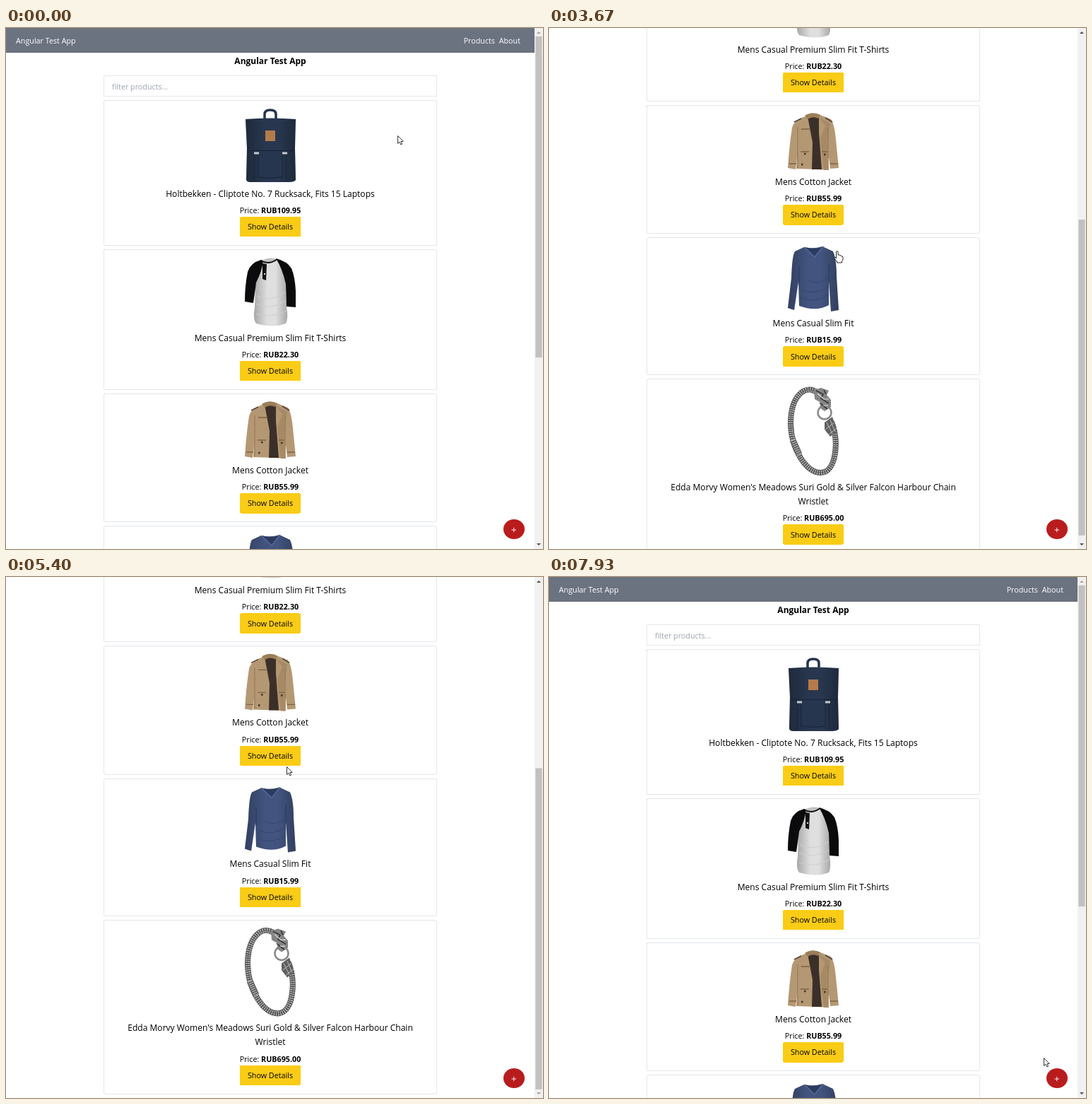
Animation of 760 by 737 pixels, one loop 8000 ms. Source, as an HTML page:

```html
<!DOCTYPE html>
<html lang="en">
<head>
<meta charset="utf-8">
<title>Angular Test App</title>
<style>
  html, body { margin: 0; width: 100%; height: 100%; overflow: hidden; background: #fff; }
  svg { display: block; width: 760px; height: 737px; font-family: "Open Sans", "Noto Sans", sans-serif; }
  text { font-size: 10.75px; white-space: pre; }
  .mid { text-anchor: middle; }
  .end { text-anchor: end; }
  .big { font-size: 12.05px; }
  .head { font-size: 12px; }
  .head, .price { font-weight: 700; }
  .nav { fill: #fff; }
  .box { fill: #fff; stroke: #e5e7eb; }
  .box, .button { shape-rendering: crispEdges; }
  .button { fill: #facc15; }
</style>
</head>
<body>
<svg id="stage" viewBox="0 0 760 737"></svg>
<script>
const LOOP = 8000, VIEW = 737, MAX = 419.6;
const $ = id => document.getElementById(id);
const text = (x, y, str, cls = "", more = "") => `<text x="${x}" y="${y}" class="${cls}" ${more}>${str}</text>`;
const path = (d, fill, more = "") => `<path d="${d}" fill="${fill}" ${more}/>`;
const line = (d, color, width = 1, more = "") => path(d, "none", `stroke="${color}" stroke-width="${width}" ${more}`);
const shaded = (d, fill) => path(d, fill) + path(d, "url(#shade)");

// Product pictures, placed in page coordinates
const backpack =
  line("M366 130V122Q366 116 374 116T382 122V130", "#25344d", 3.5) +
  shaded("M339 129Q374 126 410 129L409 170L410 215Q408 218 400 218H346Q340 218 340 214L341 170Z", "#28374f") +
  path("M357 176H391V211Q374 214 357 211Z", "#27364f") +
  line("M341 173.5H409M357 178V211Q374 214 391 211V178", "#182238") +
  line("M351.5 175V216M396.5 175V216", "#1b263c", 1.5) +
  line("M351 177H358M391 177H398", "#c5c8cb", 3) +
  path("M367 145H381V160H367Z", "#b57a4a");

const raglan =
  shaded("M361 329Q372 336 384 328Q393 343 396 360L397 395Q400 410 396 418Q378 425 354 418Q349 412 352 395L353 362Q358 345 361 329Z", "#dfdfe0") +
  path("M361 328Q346 332 342 345Q338 365 338 387L350 389L353 368L354 360Q362 345 364 329Z", "#0b0b0d") +
  path("M382 326Q398 330 404 340Q409 352 410 372V395L397 394L396 362Q391 340 382 326Z", "#0b0b0d") +
  path("M362 329Q372 323 384 327Q373 334 364 332Z", "#c2c2c4") +
  line("M361 329Q371 336 384 327", "#111", 2) +
  path("M363 333L369 334L368 357L363 355Z", "#111") +
  path("M365 347h2v2h-2z", "#ddd") +
  line("M355 379Q375 389 396 374M354 390Q372 400 396 386M354 404Q376 412 397 400", "#cfcfd1");

const jacket =
  path("M363 533Q373 526 384 531L399 537Q404 544 406 566L410 606L398 607L396 590V609L379 608L350 607L351 590L349 608L338 606Q340 575 344 549Q347 538 363 533Z", "#b49874") +
  path("M366 533Q374 529 382 533L382 556L386 608H372L373 570Z", "#3b3029") +
  path("M362 532Q373 525 384 531L381 536Q373 532 366 537Z", "#9c7e59") +
  path("M381 534L391 546L384 565L389 609L395 609L394 570L398 543Z", "#a68a66") +
  line("M352 548V606M395 550V592", "#937650") +
  line("M357 551H370M356 583H368M386 583H394M340 600H350M398 600H409", "#806443", 1.4) +
  line("M347 541L357 536M391 535L401 541", "#504437", 1.6) +
  line("M361 586h2.5M357 601h2.5M389 587h2.5", "#403126", 2.5);

const sweater =
  shaded("M361 718Q374 721 387 717L402 724Q407 735 407 760L410 807L399 809L396 766V800Q378 810 354 801L353 767L347 807L338 804L343 762Q344 730 348 724Z", "#42547f") +
  path("M363 718Q374 722 386 718L376 731Z", "#2c3b60") +
  line("M361 718L376 732L388 717", "#566894", 1.5) +
  line("M354 770V745M396 768V742", "#2d3d65", 1.2) +
  line("M357 778Q377 787 396 773M355 789Q376 799 396 785M366 765Q382 773 395 761", "#36466f");

const band = "M381 925C364 910 342 927 342 968C343 1004 364 1037 385 1037C406 1036 411 995 400 965";
const bracelet =
  line(band, "#4c4c4c", 8) + line(band, "#c8c8c8", 6.5, 'stroke-dasharray="1.3 1.7"') +
  line(band, "#666", 1, 'stroke-dasharray="2 1"') +
  line("M345 991L354 1011", "#5c5c5c", 9) + line("M345 991L354 1011", "#ccc", 7, 'stroke-dasharray="1 2"') +
  '<circle cx="390" cy="952" r="9.5" fill="none" stroke="#888" stroke-width="2.5"/>' +
  path("M375 920L385 917L396 921L393 927L399 934V944L390 950L383 945L385 938L376 933Z", "#858585") +
  line("M378 921L388 926L385 932L396 939M389 920L392 926M383 938L394 947", "#333", 1.6) +
  line("M380 925L389 933L396 933M388 942L395 942", "#ddd", 1.2) +
  path("M390 966L401 958L408 978L398 986L390 976Z", "#606060") +
  line("M393 966L401 982M398 963L405 979M391 976L404 966M396 983L407 974", "#bbb", 1);

const cards = [
  [102.5, 307.5, backpack, "109.95", "Holtbekken - Cliptote No. 7 Rucksack, Fits 15 Laptops"],
  [313.5, 511.5, raglan, "22.30", "Mens Casual Premium Slim Fit T-Shirts"],
  [517.5, 698.7, jacket, "55.99", "Mens Cotton Jacket"],
  [704.9, 898.9, sweater, "15.99", "Mens Casual Slim Fit"],
  [904.8, 1150.8, bracelet, "695.00", "Edda Morvy Women's Meadows Suri Gold &amp; Silver Falcon Harbour Chain", "Wristlet"]
];

const card = ([top, bottom, art, price, ...title]) =>
  `<rect class="box" x="138.5" y="${top}" width="471" height="${bottom - top}" rx="2.5"/>` + art +
  title.map((row, i) => text(374, bottom - 69 - 20 * (title.length - 1 - i), row, "mid big")).join("") +
  text(374, bottom - 45.5, `Price: <tspan class="price">RUB${price}</tspan>`, "mid") +
  `<rect class="button" x="331" y="${bottom - 40.5}" width="86" height="28.3" rx="2"/>` +
  text(374, bottom - 22.3, "Show Details", "mid");

$("stage").innerHTML = `
  <linearGradient id="shade">
    <stop stop-opacity=".25"/><stop offset=".4" stop-opacity="0"/>
    <stop offset=".65" stop-opacity="0"/><stop offset="1" stop-opacity=".25"/>
  </linearGradient>
  <g id="top">
    <rect width="760" height="35" fill="#6b7280"/>
    ${text(14, 22, "Angular Test App", "nav")}
    <g id="links">${text(692, 22, "Products", "nav end")}${text(728, 22, "About", "nav end")}</g>
    <g id="form">
      ${text(374, 51, "Angular Test App", "mid head")}
      <rect class="box" x="138.5" y="67.5" width="471" height="29" rx="1"/>
      ${text(150, 86.5, "filter products...", "", 'fill="#9ca3af"')}
      ${text(374, 117, "Loading...", "mid big", 'id="loading"')}
    </g>
  </g>
  <g id="list">${cards.map(card).join("")}</g>
  <g id="add">
    <ellipse cx="719" cy="709" rx="15" ry="14" fill="#b91c1c"/>
    ${line("M715.5 710H722M718.75 706.8V713.2", "#fff", 0.9)}
  </g>
  <g id="bar">
    <rect x="748" width="12" height="737" fill="#f1f1f1"/>
    <rect id="thumb" x="749.4" width="9.2" fill="#c1c1c1"/>
    <path id="up" d="M751 8L754 5L757 8Z"/>
    <path id="down" d="M751 729L754 732L757 729Z"/>
  </g>
  <g id="status">
    <path id="tip" fill="#cbe8c1" stroke="#b5d6aa"/>
    ${text(3, 733, "", "", 'id="url" style="font-size:8.2px" fill="#333"')}
  </g>
  <g id="pointer">
    <path id="arrow" d="M.5 .5V11.5L3 9.2L4.8 13L6.6 12.2L4.9 8.5H8.2Z" fill="#fff" stroke="#222" stroke-width=".9"/>
    <path id="hand" d="M-.5 10V1Q-.5 -.5 .8 -.5T2 1V5Q4 4 4.6 6Q6.4 5 7 7Q9 6.3 9 8.5V11Q9 13 7.5 14V16H0.5V14L-3 10Q-3.5 7.5 -1.5 8.4Z" fill="#fff" stroke="#111" stroke-width=".9"/>
    <path id="beam" d="M-3 -6.5H-1L0 -5.5L1 -6.5H3M0 -5.5V6.5M-3 7.5H-1L0 6.5L1 7.5H3" fill="none" stroke="#222"/>
  </g>`;

// Keys are [time, value, ...]
const scrollKeys = [[0, 0], [1900, 0], [1901, -20], [3130, -20], [3400, MAX], [3600, MAX], [3670, 408], [3900, 303],
  [4000, 303], [4130, 185], [4200, 185], [4330, 68], [4470, 68], [4570, 0], [4700, 0], [4830, 117], [4900, 117],
  [5030, 235], [5100, 235], [5270, 352], [5310, 352], [5395, MAX], [6030, MAX], [6320, 68], [6450, 68], [6560, 0]];
const moveKeys = [[0, 554, 152], [40, 554, 152], [270, 567, 177], [870, 709, 31], [930, 709, 30], [1130, 709, 24],
  [1400, 709, 24], [1680, 682, 19], [2700, 680, 19], [2870, 625, 39], [3130, 407, 315], [3600, 407, 316],
  [4470, 407, 316], [4590, 407, 313], [4750, 407, 313], [5250, 397, 268], [6650, 397, 268], [7270, 338, 85],
  [7360, 338, 85], [7920, 700, 680]];

function at(keys, t) {
  const n = keys.findIndex(k => k[0] > t);
  if (n < 0) return keys[keys.length - 1].slice(1);
  const a = keys[n - 1], b = keys[n];
  const u = (t - a[0]) / (b[0] - a[0]), e = u * u * (3 - 2 * u);
  return a.slice(1).map((v, i) => v + (b[i + 1] - v) * e);
}

const show = (id, on) => $(id).setAttribute("display", on ? "inline" : "none");
const move = (id, x, y) => $(id).setAttribute("transform", `translate(${x} ${y})`);

function cursorKind(x, y, scroll, topShift, hasList) {
  const linkX = hasList ? 0 : 12;
  if (y + topShift < 30 && x > 646 + linkX && x < 730 + linkX) return "hand";
  if (x > 138 && x < 610 && y + topShift > 67 && y + topShift < 97) return "beam";
  const py = y + scroll;
  const hit = hasList && cards.some(([top, bottom,,, ...title]) =>
    x > 331 && x < 417 && (py > bottom - 41 && py < bottom - 12 ||
    x > 338 && x < 411 && py > top + 12 && py < bottom - 66 - 20 * title.length));
  return hit ? "hand" : "arrow";
}

function draw(t) {
  const about = t >= 1330 && t < 1900;
  const loading = t >= 1900 && t < 4100;
  const hasList = t < 1330 || t >= 2470;
  const scroll = at(scrollKeys, t)[0];
  const topShift = scroll + (loading ? 20 : 0);
  const [x, y] = at(moveKeys, t).map(Math.round);

  move("top", 0, -topShift);
  move("links", hasList ? 0 : 12, 0);
  move("form", hasList ? 0 : 6, 0);
  move("list", 0, -scroll);
  move("add", hasList ? 0 : 12, 0);
  show("form", !about);
  show("loading", loading);
  show("list", hasList);
  show("add", !about);
  show("bar", hasList);

  const height = VIEW + MAX + (loading ? 20 : 0), track = 713;
  $("thumb").setAttribute("y", 11.8 + topShift / height * track);
  $("thumb").setAttribute("height", track * VIEW / height);
  $("up").setAttribute("fill", topShift > 0 ? "#505050" : "#a3a3a3");
  $("down").setAttribute("fill", scroll < MAX ? "#505050" : "#a3a3a3");

  const long = t < 1620;
  show("status", t >= 1330 && t < 3000);
  $("url").textContent = "localhost:4200" + (long ? "/about" : "");
  $("tip").setAttribute("d", `M-1 722.5H${long ? 83 : 58}q3 0 3 3V738H-1Z`);

  const kind = cursorKind(x, y, scroll, topShift, hasList);
  for (const id of ["arrow", "hand", "beam"]) show(id, id === kind);
  move("pointer", x, y);
}

const start = performance.now();
(function frame() {
  draw((performance.now() - start) % LOOP);
  requestAnimationFrame(frame);
})();
</script>
</body>
</html>
```
